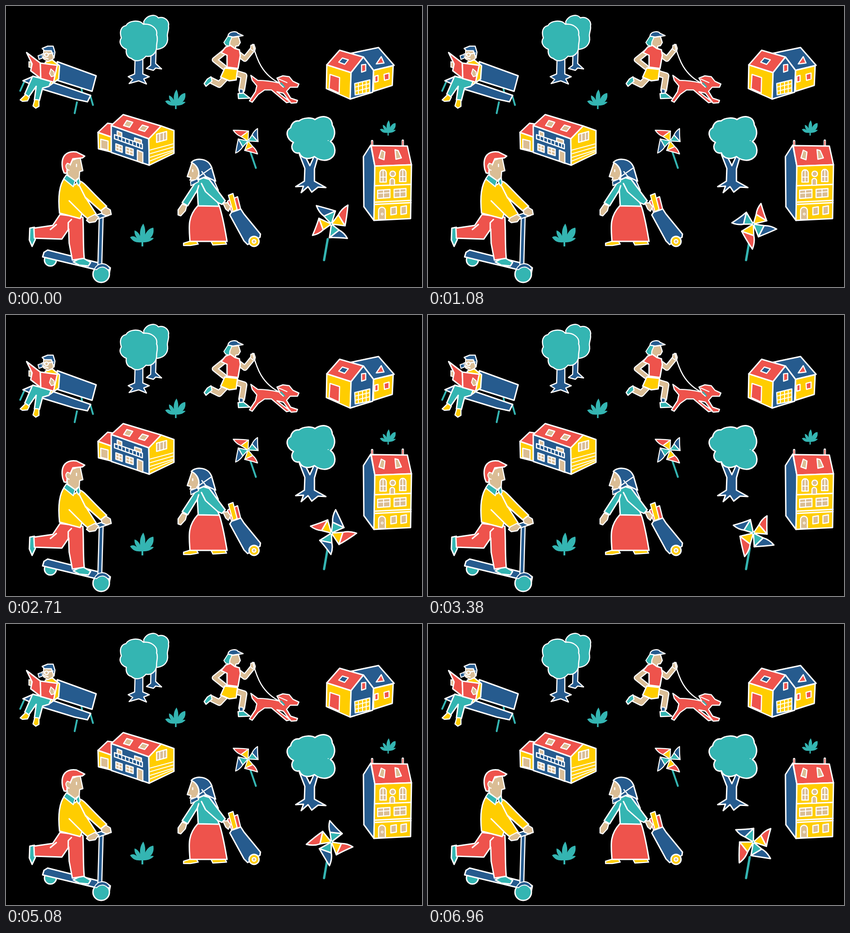
An HTML page that plays this animation: 909x616 px, repeating every 7 s.

```html
<!DOCTYPE html>
<html lang="en">
<head>
<meta charset="utf-8">
<title>Town life</title>
<style>
html, body { margin: 0; width: 100%; height: 100%; overflow: hidden; background: #000; }
svg { display: block; width: 100%; height: 100%; }
</style>
</head>
<body>
<svg id="stage" viewBox="0 0 909 616" stroke-linejoin="round" stroke-linecap="round"></svg>
<script>
const RED = '#ee534c', YELLOW = '#ffcd00', NAVY = '#265b8e', TEAL = '#34b5b2', SKIN = '#dabd95', WHITE = '#fff';

// Outlined shape, plain line, outlined limb, outlined disc
const shape = (fill, d, w = 3) => `<path fill="${fill}" stroke="#fff" stroke-width="${w}" d="${d}"/>`;
const line = (color, w, d) => `<path fill="none" stroke="${color}" stroke-width="${w}" d="${d}"/>`;
const limb = (color, w, d) => line(WHITE, w + 5, d) + line(color, w, d);
const disc = (fill, x, y, r, w = 3) => `<circle cx="${x}" cy="${y}" r="${r}" fill="${fill}" stroke="#fff" stroke-width="${w}"/>`;

const plant = (x, y, s) => `<path fill="${TEAL}" transform="translate(${x} ${y}) scale(${s})" d="M-2 0V-9C-14 -8 -20 -10 -27 -20C-21 -24 -16 -22 -12 -18C-16 -24 -18 -29 -17 -35C-11 -33 -7 -28 -5 -23C-6 -36 -3 -43 2 -50C6 -42 7 -34 6 -26C10 -34 15 -40 24 -41C26 -29 22 -22 16 -17C18 -19 22 -19 25 -18C18 -10 10 -9 2 -9V0Z"/>`;

const polar = (deg, r) => {
  const a = deg * Math.PI / 180;
  return (r * Math.cos(a)).toFixed(1) + ' ' + (r * Math.sin(a)).toFixed(1);
};

function blade(angle, r, flap, fold) {
  const tip = polar(angle, r), mid = polar(angle - 4, r * .46), corner = polar(angle + 56, 30);
  return shape(fold, `M0 0L${mid}L${corner}Z`) +
    shape(flap, `M${tip}Q${polar(angle - 8, r * .72)} ${mid}L${corner}Q${polar(angle + 24, r * .68)} ${tip}Z`);
}
const wheel = blade(0, 55, RED, YELLOW) + blade(91, 47, NAVY, TEAL) +
  blade(198, 48, RED, YELLOW) + blade(280, 52, NAVY, TEAL) + disc(TEAL, 0, 0, 2.5, 2);

const bench =
  line(TEAL, 4, 'M39 168L31 186M165 182L167 192M184 196L190 217M155 211L150 235') +
  shape(NAVY, 'M112 122L197 153L188 187L112 163Z') +
  shape(NAVY, 'M37 164L60 154L112 171L185 196L178 210L150 204L78 182Z') +
  shape(YELLOW, 'M86 123L101 118L117 131L115 160L96 174L82 160Z') +
  shape(SKIN, 'M82 98L104 98L103 116L92 122L82 116Z', 2) +
  shape(NAVY, 'M79 93L91 88L103 88L107 101L105 114L99 98L84 98Z', 2.5) +
  line(WHITE, 2.5, 'M79 105h6M88 103a4 4 0 1 0 1 0M93 105L103 103M82 113L92 116') +
  shape(NAVY, 'M70 109L79 106L80 114L72 117Z', 2) +
  shape(SKIN, 'M50 122L57 124L58 136L50 134Z', 2) +
  shape(TEAL, 'M58 154L99 164L94 176L80 180L73 207L62 206L66 176L50 199L41 193Z') +
  shape(RED, 'M45 102L75 125L76 159L54 142L57 127Z') +
  shape(RED, 'M75 125L112 130L104 167L76 159Z') +
  shape(SKIN, 'M98 138L105 144L106 153L99 155L95 148Z', 2) +
  shape(YELLOW, 'M31 206L43 194L51 200L47 208L36 209Z', 2.5) +
  shape(YELLOW, 'M63 205L72 206L72 220L65 224L59 219Z', 2.5);

const trees =
  shape(NAVY, 'M317 94H328L327 126L340 138L327 136L322 141L307 137L316 130Z', 2.5) +
  shape(TEAL, 'M301 34C308 19 327 17 333 26C345 22 358 32 355 44C357 52 351 60 353 68C355 84 345 93 331 95C315 95 300 70 301 34Z', 2.5) +
  shape(NAVY, 'M282 116H299V149L313 155L301 160L307 171L290 164L269 170L277 161L267 155L281 149Z', 2.5) +
  shape(TEAL, 'M262 43C268 32 291 29 300 40C318 38 332 50 329 63C333 72 329 80 329 88C330 103 318 113 306 110C298 120 283 124 274 115C262 112 262 100 263 95C250 90 246 78 252 70C247 55 252 45 262 43Z', 2.5) +
  shape(NAVY, 'M641 325L655 332L664 350L673 330L681 333L674 357V384L699 398L682 397L668 408L660 396L645 409L650 395L633 396L652 384L653 356Z') +
  shape(TEAL, 'M640 252C650 244 668 244 675 249C691 238 712 241 713 261C722 275 718 290 709 297C721 306 722 325 711 333C700 342 683 338 674 330C660 338 645 334 641 322C627 325 620 309 628 299C612 291 610 273 622 267C624 256 632 251 640 252Z') +
  `<circle cx="704" cy="295" r="1" fill="#fff"/>`;

const runner =
  limb(SKIN, 8, 'M477 101L456 118L476 134') +
  limb(SKIN, 8, 'M509 106L522 116L539 95') +
  limb(SKIN, 10, 'M480 157L466 172L448 163') +
  limb(SKIN, 10, 'M504 148L520 153L515 184') +
  shape(TEAL, 'M448 155L450 165L437 176L433 170L440 160Z', 2.5) +
  shape(NAVY, 'M510 182L518 183L518 192L510 191Z', 2) +
  shape(TEAL, 'M507 192L519 191L533 202L508 203Z', 2.5) +
  shape(YELLOW, 'M478 136L506 139L505 146L503 162L488 164L469 156Z') +
  shape(SKIN, 'M490 69L508 67L512 80L508 87L502 88L502 94L488 92Z', 2.5) +
  shape(RED, 'M480 90L490 86L500 93L510 96L512 108L507 137L483 134L483 108L470 102Z') +
  shape(TEAL, 'M485 66L494 68L489 79L488 88L480 86L476 80Z', 2) +
  shape(NAVY, 'M485 66C486 55 505 54 507 60L518 65L496 68Z', 2.5) +
  shape(SKIN, 'M535 86L542 84L545 93L539 98L534 94Z', 2) +
  line(WHITE, 2.5, 'M539 84C547 112 557 151 602 171') +
  shape(RED, 'M535 152L550 163C568 163 585 166 598 169L592 158L605 153L619 155L627 165L640 171L637 178L621 178L613 187L622 202L637 207L635 212L623 213L606 191L592 188L621 210L613 212L580 184L565 184L551 194L538 211L532 208L545 188L548 175L538 163Z', 2.5) +
  line(TEAL, 3, 'M601 169L608 177') + line(WHITE, 2, 'M598 171L606 178M614 168L605 164L596 160');

const barn =
  shape(NAVY, 'M752 104L814 91L848 130L803 141L781 112Z') +
  shape(YELLOW, 'M803 141L846 131L844 174L803 187Z') +
  shape(YELLOW, 'M701 129L754 146L752 204L700 181Z') +
  shape(RED, 'M701 129L729 97L781 112L754 146Z') +
  shape(NAVY, 'M754 146L781 112L803 141L801 189L752 204Z') +
  shape(NAVY, 'M735 114L748 118L740 128L727 123Z', 2.5) +
  shape(RED, 'M708 150L729 157L728 191L706 181Z', 2.5) +
  shape(RED, 'M777 129L786 128V142L777 145Z', 2.5) +
  shape(RED, 'M809 127L820 111L826 125Z', 2.5) +
  shape(RED, 'M806 154L813 152V165L806 167ZM826 150L837 147V160L827 163Z', 2.5) +
  shape(YELLOW, 'M762 170L795 162V189L763 195Z', 2.5) +
  line(WHITE, 2, 'M762 178L795 170M763 187L795 179M770 168V194M779 166V192M787 164V190');

const villa =
  shape(YELLOW, 'M201 277L230 287V320L202 313Z') +
  shape(RED, 'M201 277L222 257L236 259L230 287Z') +
  shape(SKIN, 'M207 292L223 296V316L207 312Z', 2.5) +
  shape(NAVY, 'M230 262L312 291L313 349L230 321Z') +
  shape(YELLOW, 'M339 263L367 273V323L313 349L312 291Z') +
  shape(RED, 'M256 238L339 263L312 291L230 262Z') +
  shape(SKIN, 'M264 251L277 255L270 266L257 262ZM298 261L311 265L303 275L290 271Z', 2.5) +
  shape(SKIN, 'M329 281L351 275V293L329 299Z', 2.5) +
  line(WHITE, 2, 'M336 279V297M344 277V295M314 316L366 302M314 324L366 309M314 332L366 316M314 340L366 319') +
  shape(SKIN, 'M243 274L253 278V287L243 284ZM281 289L296 294V304L281 300Z', 2.5) +
  shape(NAVY, 'M237 282L298 303V313L237 291Z', 2.5) +
  line(WHITE, 2, 'M245 285V294M253 288V296M261 290V299M269 293V302M277 296V305M285 299V308M292 301V311') +
  shape(SKIN, 'M240 302L254 307V321L240 316ZM262 309L278 314V328L262 323ZM287 316L299 321V345L287 340Z', 2.5) +
  line(WHITE, 2, 'M247 304V318M240 309L254 314M270 312V325M262 316L278 321');

const arch = (x, y, w, h) => shape(SKIN, `M${x} ${y}v${-h + w / 2}a${w / 2} ${w / 2} 0 0 1 ${w} 0v${h - w / 2}z`, 2.5);
const pane = (x, y, w, h) => shape(SKIN, `M${x} ${y}l${w} -2v${h}l${-w} 2z`, 2.5);
const tower =
  line(WHITE, 5, 'M800 296V307M867 295V307') + line(RED, 2, 'M800 297V306M867 296V306') +
  shape(NAVY, 'M797 305L806 351L804 470L782 440L781 330Z') +
  shape(RED, 'M798 306L877 307L886 348L806 351Z') +
  shape(YELLOW, 'M806 351L886 348L884 466L804 470Z') +
  shape(SKIN, 'M815 333L820 316L828 320L826 337ZM850 315L857 317L864 333L852 336Z', 2.5) +
  line(WHITE, 3, 'M806 394L885 391M806 430L885 426M806 435L885 431') +
  arch(817, 386, 14, 27) + arch(860, 385, 14, 27) + disc(SKIN, 845, 368, 6, 2.5) + arch(839, 393, 10, 15) +
  line(WHITE, 2, 'M824 360V386M817 375H831M867 359V385M860 374H874') +
  pane(812, 404, 27, 18) + pane(848, 402, 26, 18) +
  line(WHITE, 2, 'M825 403V421M812 411L839 409M861 401V419M848 409L874 407') +
  arch(814, 468, 15, 27) + disc(SKIN, 822, 456, 2, 1.5) + pane(841, 442, 12, 16) + pane(863, 440, 12, 17);

const scooter =
  disc(TEAL, 97, 557, 13) +
  shape(TEAL, 'M62 485L52 487L51 513L57 527L64 512Z') +
  shape(NAVY, 'M91 535L218 567L228 574L226 585L80 550L83 540Z') +
  disc(TEAL, 208, 588, 18) +
  limb(NAVY, 6, 'M208 463L205 568') +
  shape(NAVY, 'M193 577C200 562 219 560 228 577L222 578C214 570 205 571 198 578Z', 2) +
  shape(TEAL, 'M147 561L166 551L185 562L180 570L160 568Z') +
  shape(RED, 'M118 457L168 463C170 495 168 525 171 553L145 557L138 520L137 489L122 511L62 509L61 487L102 481Z') +
  line(WHITE, 3, 'M136 490V475L143 468M110 479L97 490') +
  limb(NAVY, 7, 'M201 462L222 455') +
  shape(SKIN, 'M207 446L217 440L228 447L230 457L219 460L210 456Z', 2.5) +
  shape(YELLOW, 'M128 377L150 392L161 384C171 386 178 399 220 439L207 449L174 420L197 456L182 469L166 456L162 466L117 454C114 425 115 394 128 377Z') +
  line(WHITE, 3, 'M138 427L170 459M160 393L174 421') +
  shape(SKIN, 'M180 464L194 457L203 463L195 473L182 475L176 470Z', 2.5) +
  shape(SKIN, 'M139 340L162 332L168 361L161 363L160 376L151 383L135 371L131 355Z', 2.5) +
  shape(TEAL, 'M132 370L151 383L147 396L126 379ZM153 384L160 376L162 389L158 394Z', 2.5) +
  shape(RED, 'M124 358C118 328 133 317 154 320L172 329L167 333L146 335L140 349L134 345L133 367L127 366Z') +
  shape(SKIN, 'M140 347C129 340 127 358 138 360', 2) + line(WHITE, 2.5, 'M154 347V352');

const shopper =
  shape(YELLOW, 'M388 520L414 512L420 522L403 525H388ZM448 516L478 515L482 522L452 524Z', 2.5) +
  shape(RED, 'M484 428L491 423L501 449L493 452ZM497 422L506 418L513 446L502 450Z', 2.5) +
  shape(YELLOW, 'M486 415L496 411L505 446L496 451Z', 2.5) +
  shape(NAVY, 'M489 458L493 452L513 445L520 456L556 500L555 507L528 523L520 515Z') +
  disc(YELLOW, 542, 516, 11) + disc(SKIN, 542, 516, 4, 2.5) +
  shape(SKIN, 'M385 434L395 438L392 449L382 460L376 458L376 447Z', 2.5) +
  shape(SKIN, 'M474 432L484 431L491 440L486 450L480 445Z', 2.5) +
  shape(RED, 'M419 438L466 438C474 462 479 492 483 516H402C400 485 396 463 419 438Z') +
  shape(NAVY, 'M437 374L454 381L464 404L440 385Z', 2.5) +
  shape(TEAL, 'M415 385L430 376L444 380L479 427L472 435L463 431L466 439L420 438L418 404L397 438L385 431Z') +
  line(WHITE, 3, 'M427 389L436 407L464 432M418 404L421 394') +
  shape(SKIN, 'M406 344L396 374L404 376L402 382L418 381L423 360L418 347Z', 2.5) +
  shape(NAVY, 'M405 343C414 332 441 333 449 353L458 384L437 374L420 381C425 362 418 349 405 343Z') +
  shape(NAVY, 'M403 385L418 379L421 385L404 394Z', 2) +
  line(WHITE, 2.5, 'M417 377L450 354M437 374L428 363M408 359V363');

document.getElementById('stage').innerHTML =
  bench + trees + runner + barn + villa + tower + scooter + shopper +
  plant(371, 226, .86) + plant(298, 527, 1) + plant(835, 284, .67) +
  line(TEAL, 4, 'M534 320L546 355') +
  `<g transform="translate(529 296) rotate(216) scale(.73)">${wheel}</g>` +
  line(TEAL, 5, 'M703 511L695 557') +
  `<g id="spin">${wheel}</g>`;

// Each 3.5 s cycle: a gust dies down into a steady spin
function angleAt(t) {
  const gust = 1 - Math.min(t / .83, 1);
  return -86.5 + 165 * t - 322.5 * gust * gust;
}

const spin = document.getElementById('spin'), start = performance.now();
function draw(now) {
  const ms = Math.max(0, now - start) % 7000;
  const step = Math.floor((ms + 5) * 24 / 1000) % 84;
  spin.setAttribute('transform', `translate(711 478) rotate(${angleAt(step / 24)})`);
  requestAnimationFrame(draw);
}
draw(start);
</script>
</body>
</html>
```
